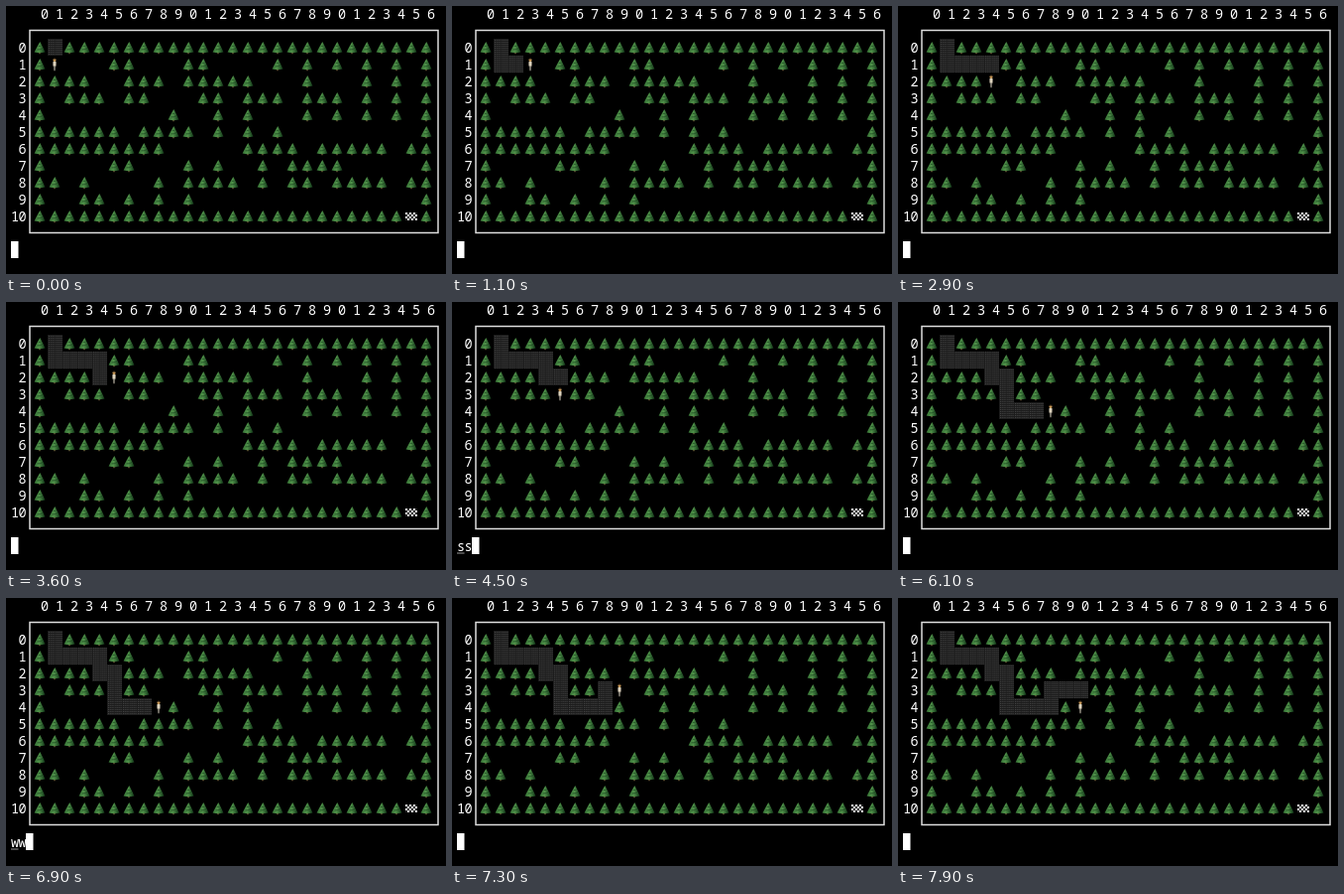
Write an HTML page that moves like this. It is 444 by 270 pixels and loops after 8 s.

```html
<!DOCTYPE html>
<html lang="en">
<head>
<meta charset="utf-8">
<title>Forest maze</title>
<style>
  html, body { margin: 0; width: 100%; height: 100%; overflow: hidden; background: #000; }
  svg { display: block; }
  text { font: 500 13.5px "Noto Sans Mono", "DejaVu Sans Mono", monospace; letter-spacing: -.6px; fill: #fff; white-space: pre; }
</style>
</head>
<body>
<svg width="444" height="270" viewBox="0 0 444 270">
  <defs>
    <pattern id="shade" x="27" width="7.5" height="2" patternUnits="userSpaceOnUse">
      <path d="M0 0h7.5v2h-7.5z" fill="#1c1c1c"/>
      <path d="M1 .5h6.5" stroke="#464646" stroke-dasharray="1"/>
    </pattern>
    <linearGradient id="leaf">
      <stop offset=".1" stop-color="#3c7a3a"/>
      <stop offset=".45" stop-color="#4f9149"/>
      <stop offset=".9" stop-color="#1b4520"/>
    </linearGradient>
    <g id="tree">
      <path d="M-1 4h2v2.3h-2z" fill="#4d3a24"/>
      <path d="M.3-6L2.4-2 3.9.9 5.4 4.6Q0 6-5.4 4.6L-3.6.9-2-2Z" fill="url(#leaf)"/>
      <path d="M-2.4 1.8Q0 2.4 3 .6M-1.2-1.6Q.3-1.2 1.5-2.1" fill="none" stroke="#1b4520" stroke-width=".7"/>
    </g>
    <g id="flag">
      <path d="M-6-4h12v8h-12z" fill="#222"/>
      <path d="M-6-3H6M-6 1H6" stroke="#eee" stroke-width="2" stroke-dasharray="2"/>
      <path d="M-4-1H6M-4 3H6" stroke="#eee" stroke-width="2" stroke-dasharray="2"/>
    </g>
  </defs>
  <rect width="444" height="270"/>
  <rect x="24" y="24.5" width="412" height="204" fill="none" stroke="#ddd" stroke-width="1.5"/>
  <g id="board"></g>
  <path id="trail" fill="url(#shade)"/>
  <g id="player">
    <path d="M-1.2 1h2.4l-.4 5.2h-1.6z" fill="#77736a"/>
    <path d="M-1.6-2.8Q0-3.6 1.6-2.8L1.5 1.6H-1.5Z" fill="#ddd3bd"/>
    <circle cy="-4.6" r="1.5" fill="#c99a58"/>
    <path d="M-1.5-4.8a1.5 1.8 0 0 1 3 0q-1.5-1-3 0z" fill="#5c4326"/>
  </g>
  <text id="echo" x="5" y="250.5"></text>
  <path id="mark" d="M5 253h7.5" stroke="#999"/>
  <rect id="cursor" y="237" width="7.5" height="17" fill="#fff"/>
</svg>
<script>
const $ = id => document.getElementById(id);
const maze = [
  '# #########################',
  '#    ##   ##    # # # # # #',
  '####  ### #####   #   # # #',
  '# ### ##   ## ### ### # # #',
  '#        #  # #   # # # # #',
  '###### #### # # #         #',
  '#########     #### ##### ##',
  '#    ##   # #  # ####     #',
  '## #    # #### # ## #### ##',
  '#  ## # # #               #',
  '#########################F#',
];
const cellX = c => 34 + 15 * c, cellY = r => 42 + 17 * r;

const label = (x, y, s) => `<text x="${x}" y="${y}">${s}</text>`;
const item = (id, c, r) => `<use href="#${id}" x="${cellX(c)}" y="${cellY(r)}"/>`;
let board = '';
for (let c = 0; c < 27; c++) board += label(35 + 15 * c, 13.3, c % 10);
maze.forEach((row, r) => {
  board += label(r < 10 ? 12.5 : 5, cellY(r) + 5.3, r);
  [...row].forEach((ch, c) => {
    if (ch !== ' ') board += item(ch === 'F' ? 'flag' : 'tree', c, r);
  });
});
$('board').innerHTML = board;

// When each step lands, and when a typed key is echoed for a moment
const steps = [[300, 'd'], [1100, 'd'], [1700, 'd'], [2900, 's'], [3500, 'd'], [4400, 's'], [4600, 's'],
  [5400, 'd'], [6000, 'd'], [6100, 'd'], [7000, 'w'], [7200, 'd'], [7600, 'd'], [7900, 's']];
const echoes = [[1000, 'd'], [1600, 'd'], [4300, 's'], [4500, 's'], [5300, 'd'], [5900, 'd'],
  [6200, 'd'], [6900, 'w'], [7500, 'd'], [7700, 'd'], [7800, 's']];
const dirs = { d: [1, 0], s: [0, 1], w: [0, -1] };
const shade = (c, r) => `M${cellX(c) - 7} ${cellY(r) - 9}h15v17h-15z`;

function draw(t) {
  let c = 1, r = 1, trail = shade(1, 0);
  for (const [at, key] of steps) {
    if (t < at) break;
    trail += shade(c, r);
    c += dirs[key][0];
    r += dirs[key][1];
  }
  $('trail').setAttribute('d', trail);
  $('player').setAttribute('transform', `translate(${cellX(c)} ${cellY(r)})`);
  const hit = echoes.find(([at]) => t >= at && t < at + 100);
  const typed = hit ? hit[1].repeat(2) : '';
  $('echo').textContent = typed;
  $('mark').setAttribute('opacity', hit ? 1 : 0);
  $('cursor').setAttribute('x', 5 + 7.5 * typed.length);
}

const start = performance.now();
function tick() {
  draw((performance.now() - start) % 8000);
  requestAnimationFrame(tick);
}
tick();
</script>
</body>
</html>
```
